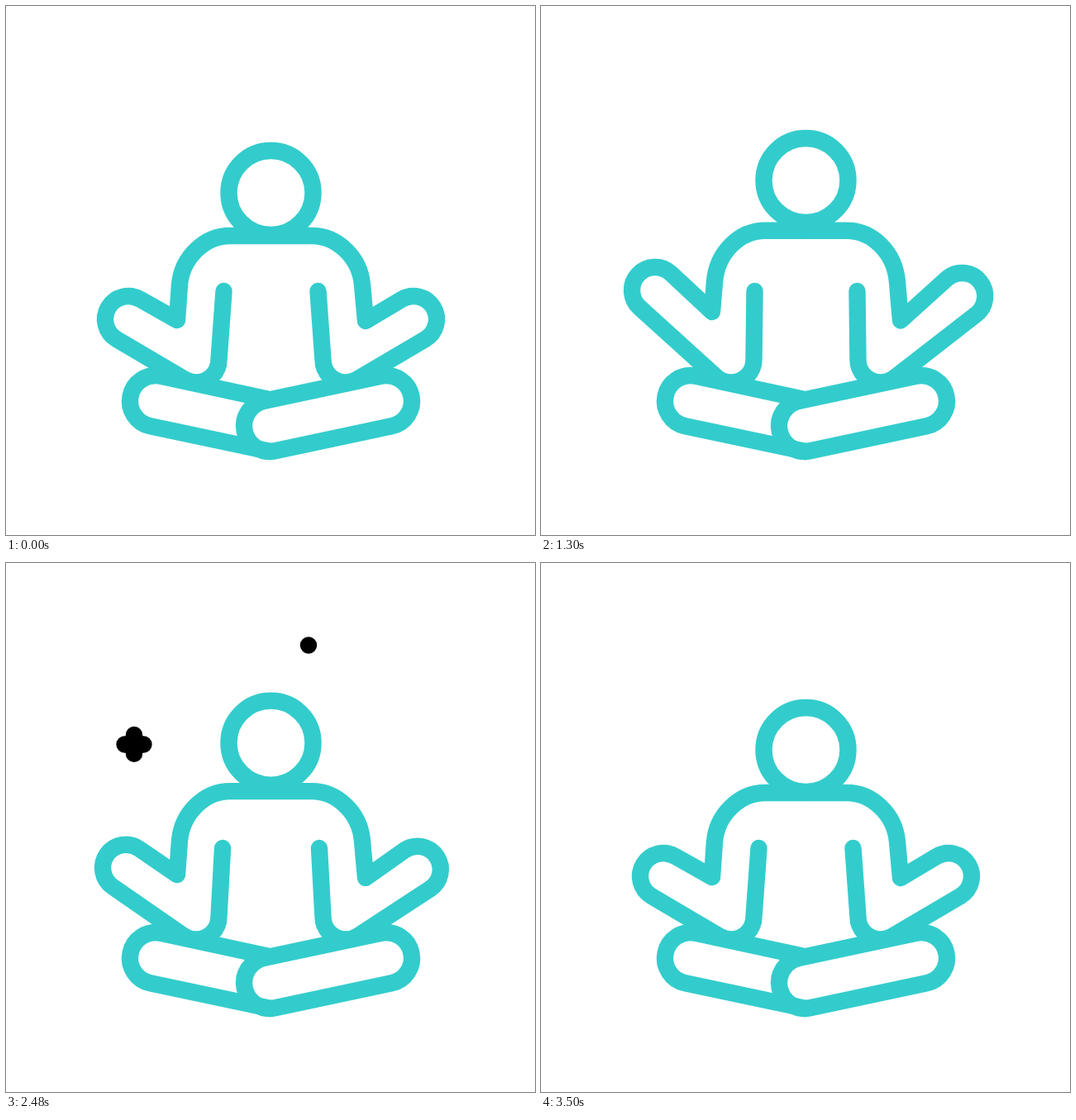
These frames come from a looping animation (640x640 px, 3600 ms). An HTML page with a canvas:

```html
<!DOCTYPE html>
<html>
<head>
<meta charset="utf-8">
<style>
html, body { margin: 0; width: 100%; height: 100%; overflow: hidden; background: #fff; }
canvas { display: block; }
</style>
</head>
<body>
<canvas id="stage" width="640" height="640"></canvas>
<script>
const ctx = document.getElementById('stage').getContext('2d');
const LOOP = 3600, FALL = 2000, MID = 320.5, TEAL = '#33cccc';
const Q = Math.PI / 2;

const clamp = v => Math.max(0, Math.min(1, v));
const mix = (a, b, k) => a + (b - a) * k;
// Rises over `up` ms, holds, then falls back over `down` ms.
const breath = (t, up, down) => clamp(t / up) - clamp((t - FALL) / down);

// Coordinates are measured outwards from the body's centre line.
const sides = [
  { dir: -1, hand: [182.5, 344], crook: [113.5, 380, 370] },
  { dir: 1, hand: [188.8, 351], crook: [114.5, 381, 380.5] }
];

const sparkles = [
  { x: 366, y: 136, start: 2020, life: 540, size: 9, fade: [0.64, 0.64] },
  { x: 155, y: 226.6, start: 2360, life: 720, size: 22, fade: [0.64, 0.72] },
  { x: 464, y: 161, start: 2800, life: 700, size: 22, fade: [0.72, 0.64] }
];

function drawSide({ dir, hand, crook }, arm, lift) {
  const ex = 90.5, ey = 428;
  const hx = mix(172.5, hand[0], arm), hy = mix(379, hand[1], arm);
  const a = Math.atan2(hy - ey, hx - ex);
  const top = 278 - lift;
  ctx.save();
  ctx.translate(MID, 0);
  ctx.scale(dir, 1);
  ctx.beginPath();
  ctx.moveTo(mix(57, 62, arm), 345);
  ctx.arc(ex, ey, 27.5, 2 * Q, a + Q, true);
  ctx.arc(hx, hy, 28, a + Q, a - Q, true);
  ctx.lineTo(crook[0], mix(crook[1], crook[2], arm));
  ctx.lineTo(110.5, 337 - lift / 2);
  ctx.bezierCurveTo(107.5, 304 - lift, 80, top, 49.5, top);
  ctx.lineTo(0, top);
  ctx.stroke();
  ctx.restore();
}

function drawLegs() {
  const a = Math.atan2(30, 141);
  ctx.beginPath();
  ctx.moveTo(320, 539);
  ctx.arc(181, 478, 31, Q + a, 3 * Q + a);
  ctx.lineTo(316, 475.5);
  ctx.stroke();
  ctx.beginPath();
  ctx.arc(319, 508, 31, Q - a, 3 * Q - a);
  ctx.arc(460, 478, 31, -Q - a, Q - a);
  ctx.closePath();
  ctx.stroke();
}

function drawSparkle({ x, y, start, life, size, fade }, t) {
  const p = (t - start) / life;
  if (p < 0 || p >= 1) return;
  const [h, v] = fade.map(f => 0.01 + size * Math.min(clamp(p / 0.32), clamp((0.85 - p) / (0.85 - f))));
  const cy = y - 43 * Math.min(p, 0.85);
  ctx.beginPath();
  ctx.moveTo(x - h, cy);
  ctx.lineTo(x + h, cy);
  ctx.moveTo(x, cy - v);
  ctx.lineTo(x, cy + v);
  ctx.stroke();
}

function draw(now) {
  const t = now % LOOP;
  ctx.fillStyle = '#fff';
  ctx.fillRect(0, 0, 640, 640);
  ctx.lineWidth = 20.4;
  ctx.lineCap = ctx.lineJoin = 'round';
  ctx.strokeStyle = TEAL;

  ctx.beginPath();
  ctx.arc(MID, 226 - 15 * breath(t, 1300, 1080), 51, 0, 4 * Q);
  ctx.stroke();

  const arm = breath(t, 850, 680), lift = 6.3 * breath(t, 1300, 680);
  sides.forEach(s => drawSide(s, arm, lift));
  drawLegs();

  ctx.strokeStyle = '#000';
  sparkles.forEach(s => drawSparkle(s, t));
}

let begin;
function tick(now) {
  begin ??= now;
  draw(now - begin);
  requestAnimationFrame(tick);
}
draw(0);
requestAnimationFrame(tick);
</script>
</body>
</html>
```
